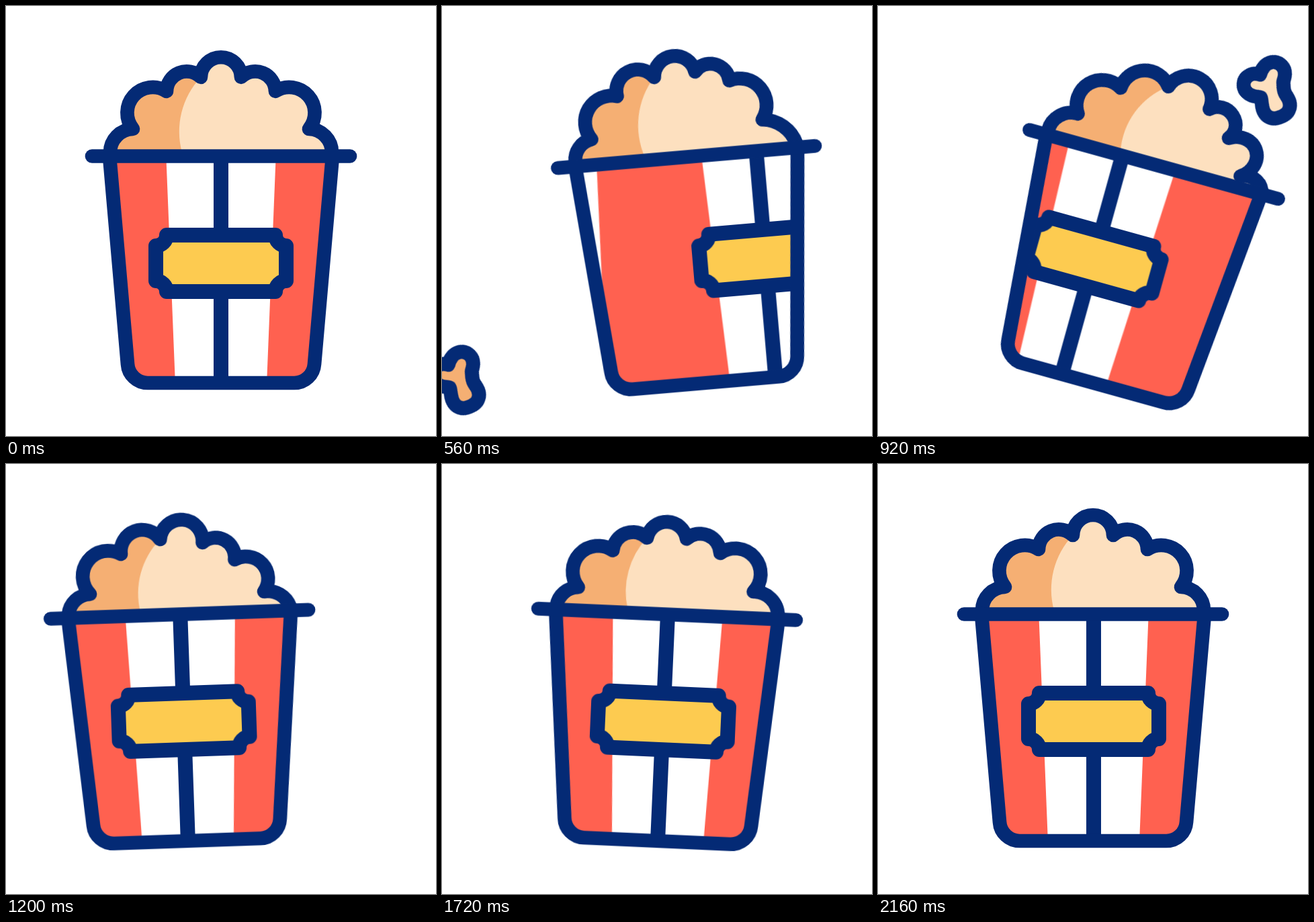
These frames come from a looping animation (640 px wide and 640 px high, 2.56 s). An HTML page without scripts:

```html
<!DOCTYPE html>
<html lang="en">
<head>
<meta charset="utf-8">
<title>Popcorn bucket</title>
<style>
html, body { margin: 0; width: 100%; height: 100%; overflow: hidden; background: #fff; }
svg { display: block; width: 100vw; height: 100vh; }

.line { fill: none; stroke: #042a75; stroke-width: 20.7; stroke-linecap: round; stroke-linejoin: round; }
.bar { stroke: #042a75; stroke-width: 22; }
.ticket { fill: #fdcb50; stroke: #042a75; stroke-width: 22; stroke-linejoin: round; }
.piece { stroke: #042a75; stroke-width: 42; stroke-linejoin: round; paint-order: stroke; }
.light { fill: #fde0bf; }
.dark { fill: #f5af73; }
.red { fill: #ff6150; }

.slide, .tilt, .spin, .pop, .shade, .left, .right { animation: 2560ms linear infinite; }
.slide { animation-name: slide; }
.tilt { animation-name: tilt; transform-origin: 320px 561px; }
.spin { animation-name: spin; }
.pop { animation-name: pop; }
.shade { animation-name: shade; }
.left { animation-name: left; }
.right { animation-name: right; }

@keyframes slide {
  0% { transform: translateX(0); animation-timing-function: cubic-bezier(.33,0,.67,.43); }
  14.0625% { transform: translateX(40px); animation-timing-function: cubic-bezier(.33,.47,.67,1); }
  24.61% { transform: translateX(76px); animation-timing-function: cubic-bezier(.33,0,.67,.24); }
  28.125% { transform: translateX(64.6px); animation-timing-function: cubic-bezier(.33,.3,.67,.71); }
  35.9375% { transform: translateX(.6px); animation-timing-function: cubic-bezier(.33,.48,.67,1); }
  46.5% { transform: translateX(-50.2px); animation-timing-function: ease-in-out; }
  64.06%, 100% { transform: translateX(0); }
}

@keyframes tilt {
  0% { transform: rotate(0); animation-timing-function: ease-in-out; }
  9.375% { transform: rotate(-18deg); animation-timing-function: cubic-bezier(.33,0,.67,.65); }
  14.0625% { transform: rotate(-13.4deg); animation-timing-function: cubic-bezier(.33,.31,.67,.29); }
  21.875% { transform: rotate(-5deg); animation-timing-function: cubic-bezier(.33,.28,.67,.73); }
  28.125% { transform: rotate(12deg); animation-timing-function: cubic-bezier(.33,.58,.67,1); }
  32.42% { transform: rotate(17.3deg); animation-timing-function: cubic-bezier(.33,0,.67,.06); }
  35.9375% { transform: rotate(15.55deg); animation-timing-function: cubic-bezier(.33,.29,.67,.74); }
  46.875% { transform: rotate(-1.93deg); animation-timing-function: cubic-bezier(.33,.53,.67,1); }
  54.3% { transform: rotate(-7.8deg); animation-timing-function: cubic-bezier(.33,0,.67,.74); }
  67.1875% { transform: rotate(2.53deg); animation-timing-function: cubic-bezier(.33,.58,.67,1); }
  72.27% { transform: rotate(4deg); animation-timing-function: ease-in-out; }
  84.375%, 100% { transform: rotate(0); }
}

/* the wrapper winds up to the left, then whips round once */
@keyframes spin {
  0% { transform: translateX(0); animation-timing-function: ease-in-out; }
  10.94% { transform: translateX(-72px); animation-timing-function: cubic-bezier(.33,0,.67,.03); }
  14.0625% { transform: translateX(-63px); animation-timing-function: cubic-bezier(.33,.11,.67,.52); }
  28.125% { transform: translateX(331px); animation-timing-function: cubic-bezier(.33,.41,.67,.82); }
  35.9375% { transform: translateX(590.8px); animation-timing-function: cubic-bezier(.33,.73,.67,1); }
  42.19%, 100% { transform: translateX(641px); }
}

@keyframes pop {
  0%, 84.375%, 100% { d: path("M155 218A35 35 0 0 1 189 183A38 38 0 0 1 239 127A30 30 0 0 1 290 106A30 30 0 0 1 350 106A30 30 27 0 1 401 127A38 38 56 0 1 451 183A35 35 0 0 1 485 218"); }
  14.0625% { d: path("M155 218A28 28 0 0 1 177 187A40 40 0 0 1 216 124A29 29 0 0 1 269 100A29.5 29.5 0 0 1 327 87A29.6 29.6 27 0 1 380 96A45 45 56 0 1 432 166A72 72 0 0 1 485 218"); }
  28.125% { d: path("M155 218A33 33 0 0 1 185 184A39 39 0 0 1 232 125A34 34 0 0 1 293 102A32 32 0 0 1 357 107A26.5 25 27 0 1 404 131A36 36 56 0 1 442 187A40 40 0 0 1 485 218"); }
  35.9375% { d: path("M155 218A35 35 0 0 1 191 181A38 38 0 0 1 242 127A37.8 37.8 0 0 1 310 106A35 35 0 0 1 378 122A26 24 27 0 1 417 156A28.4 32 56 0 1 449 206A26 26 0 0 1 485 218"); }
  46.875% { d: path("M155 218A33 33 0 0 1 188 189A38 38 0 0 1 236 131A32 32 0 0 1 295 111A31.6 31.6 0 0 1 358 118A29 29 27 0 1 405 145A33 33 56 0 1 447 194A35 35 0 0 1 485 218"); }
  67.1875% { d: path("M155 218A33 33 0 0 1 186 189A38 38 0 0 1 235 132A30 30 0 0 1 285 111A30 30 0 0 1 344 110A30 30 27 0 1 395 129A38 38 56 0 1 447 184A36 36 0 0 1 485 218"); }
}

@keyframes shade {
  0%, 84.375%, 100% { d: path("M155 218A35 35 0 0 1 189 183A38 38 0 0 1 239 127A30 30 0 0 1 290 106A118 118 0 0 0 262 218Z"); }
  14.0625% { d: path("M155 218A28 28 0 0 1 177 187A40 40 0 0 1 216 124A29 29 0 0 1 269 100A120 120 0 0 0 256 218Z"); }
  28.125% { d: path("M155 218A33 33 0 0 1 185 184A39 39 0 0 1 232 125A34 34 0 0 1 293 102A118 118 0 0 0 260 218Z"); }
  35.9375% { d: path("M155 218A35 35 0 0 1 191 181A38 38 0 0 1 242 127A37.8 37.8 0 0 1 310 106A112 112 0 0 0 267 218Z"); }
  46.875% { d: path("M155 218A33 33 0 0 1 188 189A38 38 0 0 1 236 131A32 32 0 0 1 295 111A115 115 0 0 0 262 218Z"); }
  67.1875% { d: path("M155 218A33 33 0 0 1 186 189A38 38 0 0 1 235 132A30 30 0 0 1 285 111A118 118 0 0 0 261 218Z"); }
}

@keyframes left {
  0% { transform: translate(300px,145px) rotate(80deg); }
  4.6875% { transform: translate(205px,113px) rotate(54deg); }
  9.375% { transform: translate(115px,159px) rotate(27deg); }
  14.0625% { transform: translate(56px,256px) rotate(0deg); }
  18.75% { transform: translate(36px,414px) rotate(-27deg); }
  21.875% { transform: translate(25px,550px) rotate(-45deg); }
  25.78%, 100% { transform: translate(12px,750px) rotate(-68deg); }
}

@keyframes right {
  0% { transform: translate(760px,300px); animation-timing-function: step-end; }
  26.5625% { transform: translate(440px,140px) rotate(-116deg); }
  28.125% { transform: translate(463px,123px) rotate(-104deg); }
  30.47% { transform: translate(497px,109px) rotate(-86deg); }
  32.81% { transform: translate(532px,105px) rotate(-68deg); }
  35.9375% { transform: translate(583px,120px) rotate(-44deg); }
  39.06% { transform: translate(632px,165px) rotate(-20deg); }
  42.97%, 100% { transform: translate(705px,260px) rotate(10deg); }
}
</style>
</head>
<body>
<svg viewBox="0 0 640 640">
  <defs>
    <path id="body" d="M154 223L181 533A30 30 0 0 0 211 561H429A30 30 0 0 0 459 533L486 223"/>
    <clipPath id="inside"><use href="#body"/></clipPath>
    <path id="kernel" class="piece" d="M-20 -20C-18 -26 -11 -25 -8 -20C-4 -12 2 -12 8 -15C16 -20 24 -18 24 -11C24 -4 14 -3 10 3C4 10 0 14 -2 26C-4 36 -10 36 -16 33C-24 30 -24 25 -20 19C-14 10 -7 4 -12 -4C-15 -10 -21 -13 -20 -20Z"/>
    <path id="band" fill="#fff" d="M238.3 223H401.7L388.1 561H251.9Z"/>
    <g id="front">
      <use href="#band"/>
      <path class="bar" d="M320 223V561"/>
      <path class="ticket" d="M239 341H401A16 16 0 0 0 417 357V409A16 16 0 0 0 401 425H239A16 16 0 0 0 223 409V357A16 16 0 0 0 239 341Z"/>
    </g>
  </defs>

  <g class="left dark"><use href="#kernel"/></g>
  <g class="right light"><use href="#kernel"/></g>

  <g class="slide"><g class="tilt">
    <path class="pop light" d="M155 218H485"/>
    <path class="shade dark" d="M155 218H262"/>
    <path class="pop line" d="M155 218H485"/>
    <g clip-path="url(#inside)">
      <path class="red" d="M140 223H500V561H140Z"/>
      <g class="spin">
        <use href="#front"/>
        <use href="#band" x="-320"/>
        <use href="#front" x="-640"/>
      </g>
    </g>
    <use href="#body" class="line"/>
    <path class="line" d="M128 223.5H512"/>
  </g></g>
</svg>
</body>
</html>
```
